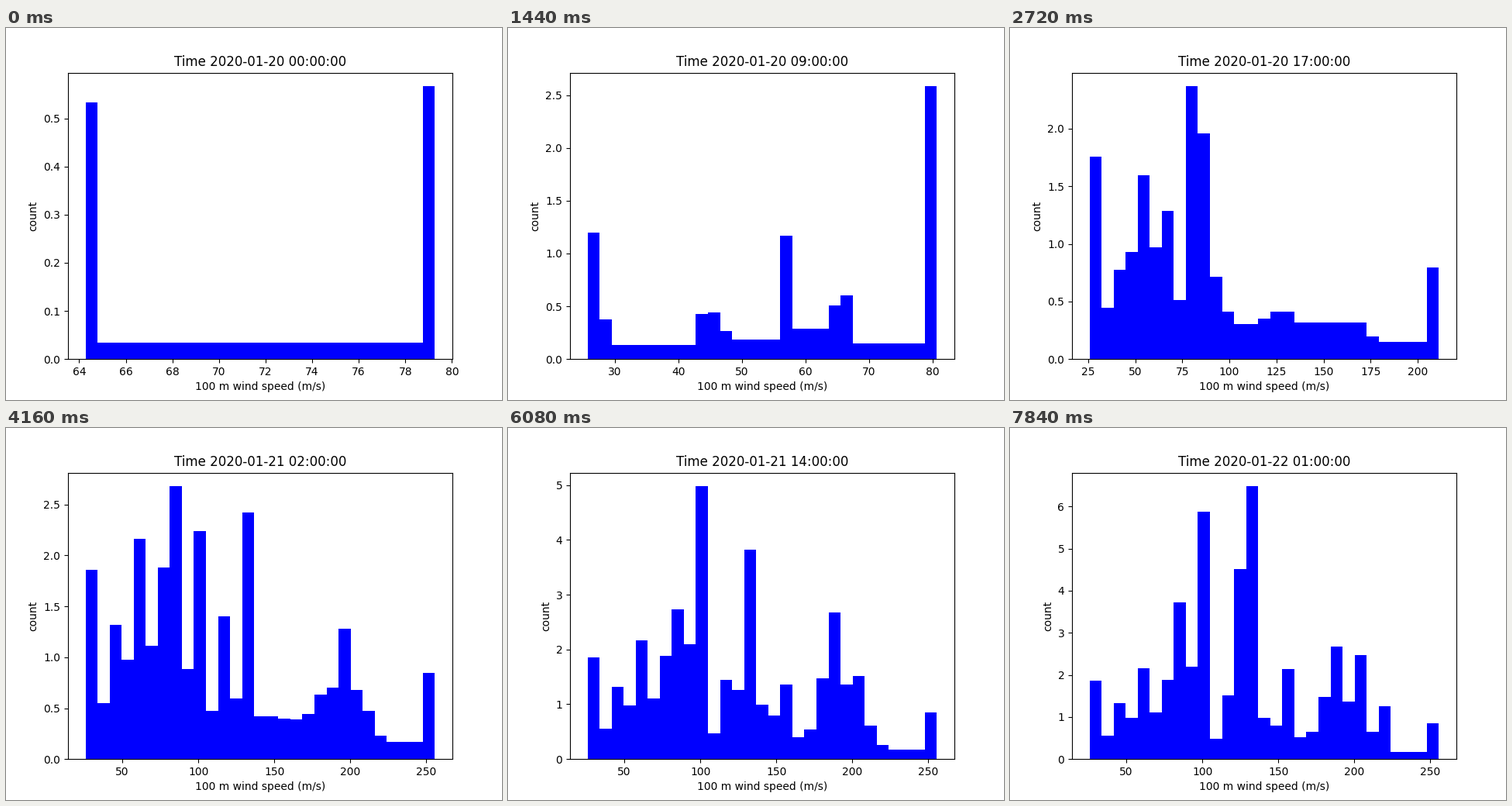
Write a matplotlib script that moves like this. It is 640 px wide and 480 px high and loops after 8000 ms.

```python
import matplotlib.pyplot as plt
import numpy as np
from matplotlib.animation import FuncAnimation

FRAMES = 50
BINS = 30

# Hourly wind speeds in order of arrival; hour h shows the first h + 2.
SPEEDS = np.array([
    79.79, 64.27, 57.7, 47.15, 42.9, 28.45, 25.73,
    57.38, 67.26, 80.5, 82.53, 88.06, 88.8, 97.73,
    118.9, 154.5, 217.6, 174.7, 134.4,
    200.93, 263.6, 197.9, 187.2, 135.5, 133.55, 120.27, 102.2, 100.0,
    98.8, 143.2, 153.15, 181.8, 185.35, 188.65, 204.7, 127.7, 101.0,
    96.94, 92.7, 130.9,
    97.47, 205.4, 218.4, 159.2, 134.9, 132.3, 129.33, 126.6, 125.5,
    124.1, 88.4,
])


def histogram(values):
    """Spread one count over each gap between sorted values, half at each end."""
    values = np.sort(values)
    edges = np.linspace(values[0], values[-1], BINS + 1)
    counts = np.diff(np.interp(edges, values, np.arange(len(values))))
    counts[0] += 0.5
    counts[-1] += 0.5
    # the top two bins share the last bar
    counts[-2] += counts[-1]
    return edges[:-1], counts[:-1]


def draw(hour):
    edges, counts = histogram(SPEEDS[:hour + 2])
    ax.cla()
    ax.bar(edges[:-1], counts, width=np.diff(edges), align="edge", color="b")
    ax.set_title(f"Time 2020-01-{20 + hour // 24} {hour % 24:02d}:00:00")
    ax.set_xlabel("100 m wind speed (m/s)")
    ax.set_ylabel("count")


fig, ax = plt.subplots(figsize=(6.4, 4.8), dpi=100)
anim = FuncAnimation(fig, draw, frames=FRAMES, init_func=lambda: draw(0),
                     interval=160, repeat=True, repeat_delay=0)
plt.show()
```
